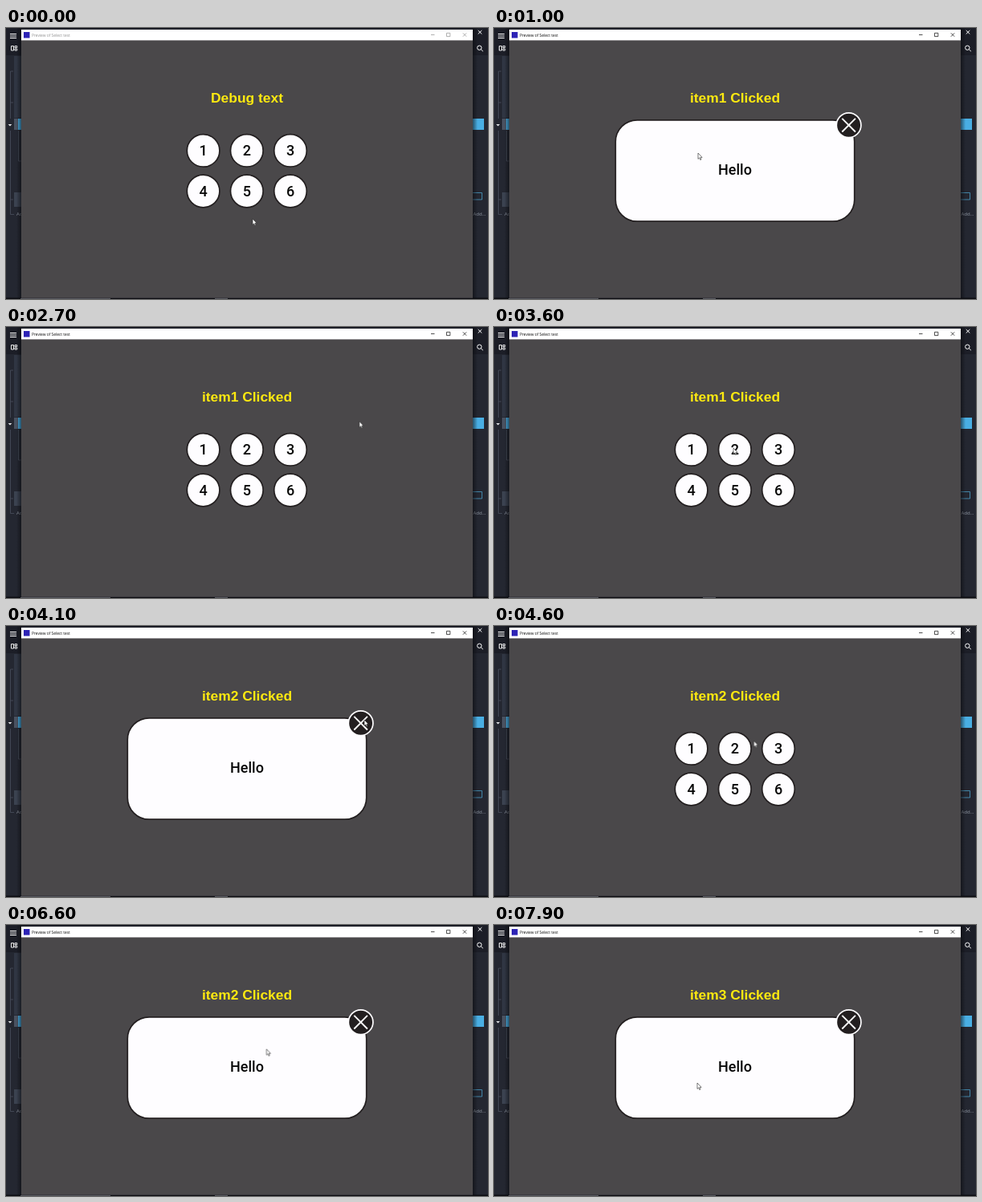
An HTML page that plays this animation: 600x338 px, repeating every 8000 ms.

```html
<!DOCTYPE html>
<html lang="en">
<head>
<meta charset="utf-8">
<title>Select test</title>
<style>
html, body { margin: 0; width: 100%; height: 100%; overflow: hidden; background: #242731; }
svg { display: block; width: 100vw; height: 100vh; }
.ui { font-family: "Open Sans", sans-serif; }
.label { font: bold 17.4px "Liberation Sans", Arial, sans-serif; fill: #fde910; }
.face { font: 500 18px Roboto, sans-serif; fill: #080808; }
.mid { text-anchor: middle; }
.line { fill: none; stroke: #fff; }

/* 1% = 80 ms */
.label, .popup, .bar, .cursor { animation: 8s step-end -4ms infinite; }
.bar { animation-name: bar; }
.popup { animation-name: popup; }
.debug { animation-name: debug; }
.one { animation-name: one; }
.two { animation-name: two; }
.three { animation-name: three; }
.cursor { animation-name: cursor; animation-timing-function: ease-in-out; }

@keyframes bar {
  0% { opacity: .45; }
  11.25%, 100% { opacity: 1; }
}
@keyframes popup {
  0%, 33.75%, 53.75% { visibility: hidden; }
  12.5%, 46.25%, 65%, 100% { visibility: visible; }
}
@keyframes debug {
  0% { visibility: visible; }
  12.5%, 100% { visibility: hidden; }
}
@keyframes one {
  0%, 46.25%, 78.75%, 100% { visibility: hidden; }
  12.5%, 65% { visibility: visible; }
}
@keyframes two {
  0%, 65%, 93.75%, 100% { visibility: hidden; }
  46.25%, 78.75% { visibility: visible; }
}
@keyframes three {
  0% { visibility: hidden; }
  93.75%, 100% { visibility: visible; }
}
@keyframes cursor {
  0% { transform: translate(307px, 238px); }
  11.25%, 17.5% { transform: translate(254px, 156px); }
  28.75%, 32.5% { transform: translate(443px, 117px); }
  45%, 46.25% { transform: translate(298px, 151px); }
  51.25%, 52.5% { transform: translate(446px, 117px); }
  61.25%, 65% { transform: translate(252.5px, 158.5px); }
  75% { transform: translate(272px, 198px); }
  76.25%, 77.5% { transform: translate(298px, 155px); }
  87.5%, 88.75% { transform: translate(349.5px, 154.5px); }
  91.25%, 92.5% { transform: translate(352px, 155px); }
  98.75%, 100% { transform: translate(253px, 197px); }
}
</style>
</head>
<body>
<svg viewBox="0 0 600 338">
  <defs>
    <linearGradient id="shade">
      <stop offset="0" stop-color="#08090c" stop-opacity=".55"/>
      <stop offset="1" stop-color="#08090c" stop-opacity="0"/>
    </linearGradient>
  </defs>

  <!-- editor behind the window -->
  <rect width="600" height="338" fill="#242731"/>
  <rect width="600" height="34" fill="#1c1e27"/>
  <rect x="10" y="35" width="9" height="77" fill="#303643"/>
  <rect x="10" y="113" width="5" height="14" fill="#4a5261"/>
  <rect x="10" y="205" width="9" height="18" fill="#3b4250"/>
  <path d="M15 113h4v14h-4zM581 113h14v14h-14z" fill="#49aee3"/>
  <path class="line" style="stroke:#4a505d" stroke-width=".8" d="M9 54H5.5V113M5.5 93H9M5.5 128V232.500H10M5.500 214H9M15.500 128V166H19"/>
  <path d="M2.700 120h4.600l-2.300 2.600z" fill="#e4e6ea"/>
  <path class="line" d="M5 7.500h8M5 10h8M5 12.500h8"/>
  <path class="line" stroke-width=".9" d="M6.500 22.500h3v5.500h-3zM11 22.500h2.800v2H11zM11 26h2.800v2H11z"/>
  <path class="line" d="M587.700 3l4.600 4.500M592.300 3l-4.600 4.500"/>
  <circle class="line" cx="589.300" cy="24.700" r="2.700"/>
  <path class="line" d="M591.300 26.700l2.500 2.400"/>
  <path class="line" style="stroke:#4b9cc4" stroke-width=".8" d="M581 205.500h11.500v8.500H581"/>
  <g class="ui" font-size="6" fill="#9299a5">
    <text x="13" y="234">Add</text>
    <text x="581.500" y="234">Add...</text>
  </g>
  <rect x="581" width="6" height="338" fill="url(#shade)"/>
  <rect x="-19" width="6" height="338" fill="url(#shade)" transform="scale(-1 1)"/>
  <rect y="336.500" width="600" height="1.500" fill="#0b0c10"/>
  <path d="M18 337h112v1H18zM260 337h16v1h-16z" fill="#55575d"/>

  <!-- preview window -->
  <rect x="19" y="2" width="562" height="334.700" fill="#4a484a"/>
  <rect x="19" y="2" width="562" height="13.400" fill="#fff"/>
  <rect x="22" y="5" width="7.500" height="7.500" fill="#2d23b5"/>
  <g class="bar">
    <text class="ui" x="32" y="10.500" font-size="4.860" fill="#111">Preview of Select test</text>
    <path class="line" style="stroke:#222" stroke-width=".8" d="M529 8.500h4.500M548.500 6.300h4.300v4.300h-4.300zM568.800 6.300l4.400 4.400M573.200 6.300l-4.400 4.400"/>
  </g>

  <g class="mid">
    <text class="label debug" x="300" y="92.500">Debug text</text>
    <text class="label one" x="300" y="92.500">item1 Clicked</text>
    <text class="label two" x="300" y="92.500">item2 Clicked</text>
    <text class="label three" x="300" y="92.500">item3 Clicked</text>
  </g>

  <g id="items" class="mid"></g>

  <g class="popup">
    <rect x="151.300" y="114.800" width="297.400" height="126.400" rx="27" fill="#fefdff" stroke="#231f20" stroke-width="1.700"/>
    <text class="face mid" x="300" y="183.400">Hello</text>
    <circle cx="441.600" cy="121.200" r="15.300" fill="#231f20" stroke="#fefdff" stroke-width="1.700"/>
    <path class="line" stroke-width="1.900" d="M433.300 112.900l16.600 16.600M449.900 112.900l-16.600 16.600"/>
  </g>

  <path class="cursor" d="M0 0V7.400L1.700 5.900 2.800 8.500 4 8 2.900 5.400H5.100Z" fill="#fff" stroke="#222" stroke-width=".6"/>
</svg>
<script>
const items = document.getElementById('items');
let markup = '';
for (let i = 0; i < 6; i++) {
  const x = 245.6 + i % 3 * 54.2;
  const y = 152.9 + Math.floor(i / 3) * 50.6;
  markup += `<circle cx="${x}" cy="${y}" r="20.3" fill="#fefdff" stroke="#231f20" stroke-width="1.7"/>
    <text class="face" x="${x}" y="${y + 6}">${i + 1}</text>`;
}
items.innerHTML = markup;
</script>
</body>
</html>
```
